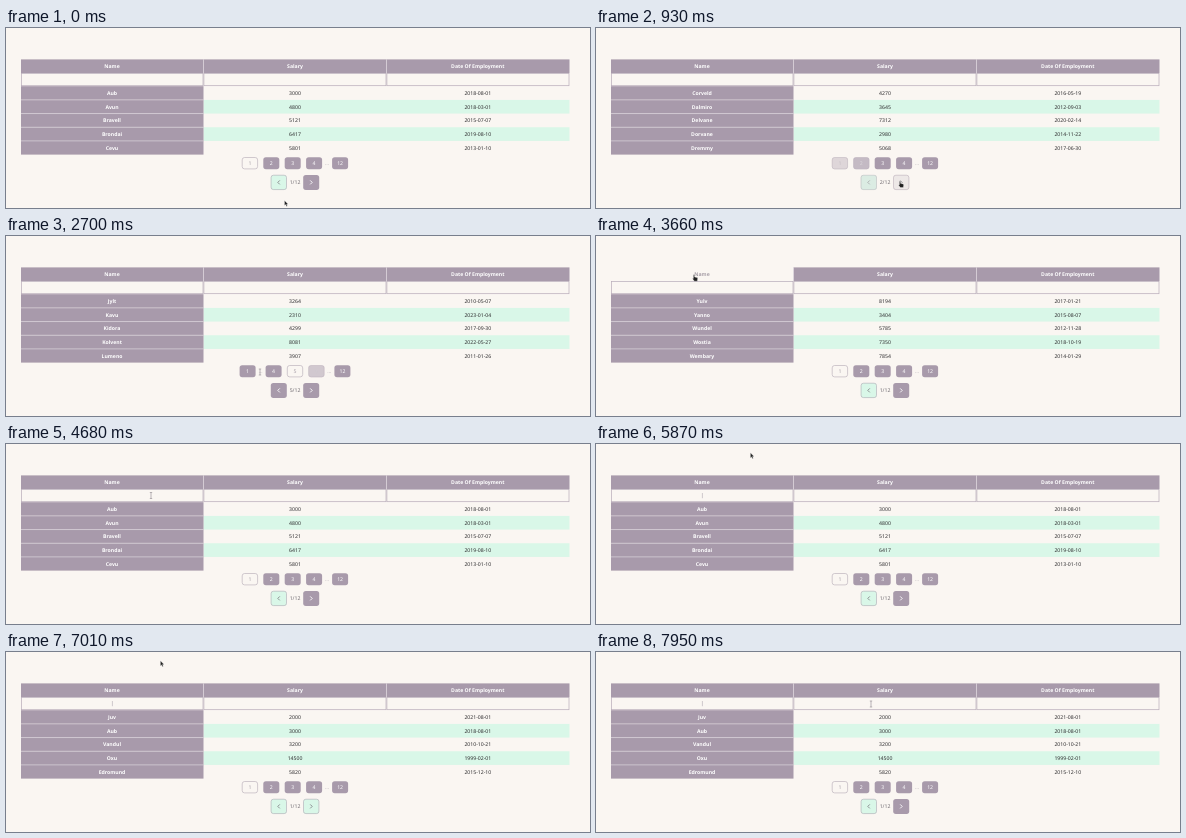
Animation of 584 by 180 pixels, one loop 8 s. Source, as an HTML page:

```html
<!DOCTYPE html>
<html lang="en">
<head>
<meta charset="utf-8">
<title>Sortable table</title>
<style>
  html, body { margin: 0; width: 100%; height: 100%; overflow: hidden; background: #faf6f2; }
  svg { display: block; width: 584px; height: 180px; }
  text {
    font: 5.15px "Noto Sans", "Open Sans", sans-serif;
    text-anchor: middle;
    text-rendering: geometricPrecision;
  }
  .b { font-weight: 700; }
</style>
</head>
<body>
<svg id="stage" viewBox="0 0 584 180"></svg>
<script>
const LOOP = 8000, FADE = 200;
const BG = '#faf6f2', PURPLE = '#a89aab', MINT = '#d9f7e8', INK = '#2b2a2c';
const COLS = [15, 197.5, 380.5, 563.5];
const MID = [106, 289, 471.8];
const ROW = 13.68;

const parse = s => s.split(',').map(r => r.trim().split(' '));
const PAGES = {
  p1: parse('Aub 3000 2018-08-01, Avun 4800 2018-03-01, Bravell 5121 2015-07-07, Brondai 6417 2019-08-10, Cevu 5801 2013-01-10'),
  p2: parse('Corveld 4270 2016-05-19, Dalmiro 3645 2012-09-03, Delvane 7312 2020-02-14, Dorvane 2980 2014-11-22, Dremmy 5068 2017-06-30'),
  p3: parse('Edromund 5820 2015-12-10, Elvaro 6153 2011-04-08, Fendrel 3790 2022-01-17, Fomira 8442 2013-10-25, Galdo 4516 2019-03-12'),
  p4: parse('Gorwina 8024 2018-04-03, Gultane 3355 2021-11-25, Hemdovel 4091 2017-04-17, Ixo 2500 2023-06-13, Juv 2000 2021-08-01'),
  p5: parse('Jylt 3264 2010-05-07, Kavu 2310 2023-01-04, Kidora 4299 2017-09-30, Kolvent 8081 2022-05-27, Lumeno 3907 2011-01-26'),
  down: parse('Yulv 8194 2017-01-21, Yanno 3404 2015-08-07, Wundel 5785 2012-11-28, Wostia 7350 2018-10-19, Wembary 7854 2014-01-29'),
  raw: parse('Juv 2000 2021-08-01, Aub 3000 2018-08-01, Vandul 3200 2010-10-21, Oxu 14500 1999-02-01, Edromund 5820 2015-12-10')
};
PAGES.found = PAGES.p1.slice(0, 2);

// [start, rows, page]
const VIEWS = [
  [0, 'p1', 1], [860, 'p2', 2], [1120, 'p3', 3], [1260, 'p4', 4], [2100, 'p5', 5],
  [2850, 'p1', 1], [3600, 'down', 1], [4330, 'p1', 1], [5990, 'found', 1], [7010, 'raw', 1]
];
const HOVER = { next: [760, 1330], slot3: [1500, 2600], slot0: [2760, 2960], name: [3180, 4400] };
const CARET = [[4980, 5470], [5870, 6370], [6760, 7510], [7940, 8000]];
const PATH = [
  [0, 278.5, 172.5], [450, 278.5, 172.5], [840, 304, 153], [1300, 304, 153],
  [1600, 312, 137.3], [1720, 312, 136.5], [2580, 312, 136.5], [2700, 254, 136],
  [2800, 242, 136], [2900, 242, 136], [3340, 98.2, 39], [3420, 98, 38.6],
  [4340, 98, 38.6], [4560, 140, 51.5], [4800, 150, 51.5], [5200, 150, 51.5],
  [5470, 154.4, 8.8], [7770, 154.4, 8.8], [7950, 275, 52]
];
const POINTER = [
  [0, 'arrow'], [760, 'hand'], [1330, 'arrow'], [1500, 'hand'], [2630, 'arrow'],
  [2670, 'beam'], [2730, 'arrow'], [2760, 'hand'], [2960, 'arrow'], [3180, 'hand'],
  [4440, 'beam'], [5290, 'arrow'], [7900, 'beam']
];

const at = (list, t) => list.filter(e => e[0] <= t).pop();
const inside = (span, t) => !!span && t >= span[0] && t < span[1];
const hovered = (id, t) => inside(HOVER[id], t);

// Linear fade: share of the last FADE ms for which the test held.
function fade(test, t) {
  const n = 20;
  let sum = 0;
  for (let i = 0; i < n; i++) sum += test(Math.max(0, t - FADE * (i + .5) / n)) ? 1 : 0;
  return sum / n;
}

const rect = (x, y, w, h, fill, more = '') =>
  `<rect x="${x}" y="${y}" width="${w}" height="${h}" fill="${fill}" ${more}/>`;
const text = (x, y, s, fill, more = '') =>
  `<text x="${x}" y="${y + 1.85}" fill="${fill}" ${more}>${s}</text>`;
const line = (d, color, w) =>
  `<path d="${d}" fill="none" stroke="${color}" stroke-width="${w}"/>`;

function button(x, y, w, h, soft, mint) {
  const box = (fill, more) => rect(x - w / 2, y - h / 2, w, h, fill, `rx="2.6" ${more}`);
  return box(PURPLE, `opacity="${(1 - soft) * (1 - mint)}"`) +
    box(MINT, `opacity="${mint}"`) +
    rect(x - w / 2 + .3, y - h / 2 + .3, w - .6, h - .6, 'none',
      `rx="2.4" stroke="#b4a9b5" stroke-width=".6" opacity="${Math.max(soft, mint)}"`);
}

function twoTone(draw, soft) {
  return `<g opacity="${1 - soft}">${draw('#fff')}</g><g opacity="${soft}">${draw('#a79fa8')}</g>`;
}

function table(t, view) {
  const rows = PAGES[view[1]];
  const hot = fade(s => hovered('name', s), t);
  let out = '';
  ['Name', 'Salary', 'Date Of Employment'].forEach((s, i) => {
    const x = COLS[i], w = COLS[i + 1] - x, soft = i ? 0 : hot;
    out += rect(x, 31.4, w, 13.6, PURPLE, `opacity="${1 - soft}"`);
    out += twoTone(c => text(MID[i], 38.4, s, c, 'class="b"'), soft);
    out += rect(x + .4, 45.5, w - .9, 12.2, BG, 'stroke="#b7abb9" stroke-width=".7"');
  });
  out += line('M197.5 31.4V45M380.5 31.4V45', '#e4dee4', .6);
  rows.forEach((r, i) => {
    const y = 58.2 + i * ROW, mid = y + ROW / 2;
    if (i % 2) out += rect(COLS[1], y, COLS[3] - COLS[1], ROW, MINT);
    out += rect(COLS[0], y, COLS[1] - COLS[0], ROW, PURPLE);
    if (i) out += line(`M15 ${y}H197.5`, '#e0d9e0', .6);
    r.forEach((s, k) => out += text(MID[k], mid, s, k ? INK : '#fff', k ? '' : 'class="b"'));
  });
  return out;
}

function field(t, view) {
  const typed = view[1] === 'found';
  const on = CARET.some(s => inside(s, t));
  return (typed ? text(106, 51.5, 'a', '#a39ba5') : '') +
    (on ? line(`M${typed ? 107.8 : 106.4} 49V54.2`, typed ? '#cfc8d0' : '#a39ba5', .5) : '');
}

const activeSlot = s => Math.min(at(VIEWS, s)[2], 3) - 1;

function pager(t, view) {
  const page = view[2], few = view[1] === 'found';
  const labels = few ? [1] : page < 4 ? [1, 2, 3, 4, 12] : [1, page - 1, page, page + 1, 12];
  const y = few ? 94.2 : 135.2;
  const xs = [0];
  for (let i = 1; i < labels.length; i++)
    xs.push(xs[i - 1] + (labels[i] - labels[i - 1] > 1 ? 26 : 21.4));
  const left = 289 - xs[xs.length - 1] / 2;
  let out = '';
  labels.forEach((n, i) => {
    const x = left + xs[i];
    const soft = fade(s => activeSlot(s) === i || hovered('slot' + i, s), t);
    out += button(x, y, 16, 12, soft, 0) + twoTone(c => text(x, y, n, c), soft);
    if (i && xs[i] - xs[i - 1] > 22) out += text(x - 13, y, '…', '#b4abb5');
  });

  const y2 = y + 19.2, gap = few ? 14.7 : 16.2;
  const arrow = (side, soft, mint) => {
    const x = 289 + side * gap;
    const mark = c => line(`M${x - side} ${y2 - 2}l${side * 2} 2l${-side * 2} 2`, c, .9);
    return button(x, y2, 16, 15, soft, mint) +
      `<g opacity="${1 - Math.max(soft, mint)}">${mark('#fff')}</g>` +
      `<g opacity="${Math.max(soft, mint)}">${mark('#84858a')}</g>`;
  };
  out += arrow(-1, 0, fade(s => at(VIEWS, s)[2] === 1, t));
  out += arrow(1, fade(s => hovered('next', s), t), fade(s => at(VIEWS, s)[1] === 'found', t));
  return out + text(289, y2, page + (few ? '/1' : '/12'), '#6f6a70');
}

const SHAPES = {
  arrow: '<path d="M0 0V5.1L1.2 4.1 2 5.9 2.9 5.5 2.1 3.8H3.7Z" fill="#222" stroke="#fff" stroke-width=".3"/>',
  hand: '<path d="M-.6 .4Q0-.4 .6 .4V2.4L3 2.9Q3.8 3.1 3.7 4L3.3 6.6H.4L-1.4 4.2Q-1.2 3.4-.6 3.8Z" fill="#222" stroke="#fff" stroke-width=".3"/>',
  beam: '<path d="M-1.2-3H1.2M0-3V3M-1.2 3H1.2" fill="none" stroke="#8d898e" stroke-width=".6"/>'
};

function pointer(t) {
  const a = at(PATH, t), b = PATH.find(p => p[0] > t) || a;
  const k = a === b ? 0 : (t - a[0]) / (b[0] - a[0]);
  const x = a[1] + (b[1] - a[1]) * k, y = a[2] + (b[2] - a[2]) * k;
  return `<g transform="translate(${x} ${y})">${SHAPES[at(POINTER, t)[1]]}</g>`;
}

const stage = document.getElementById('stage');
function draw(t) {
  const view = at(VIEWS, t);
  const shift = view[1] === 'found' ? 20.5 : 0;
  stage.innerHTML = rect(0, 0, 584, 180, BG) +
    `<g transform="translate(0 ${shift})">${table(t, view)}${field(t, view)}${pager(t, view)}</g>` +
    pointer(t);
}

let start;
function tick(now) {
  if (start === undefined) start = now;
  draw((now - start) % LOOP);
  requestAnimationFrame(tick);
}
draw(0);
requestAnimationFrame(tick);
</script>
</body>
</html>
```
